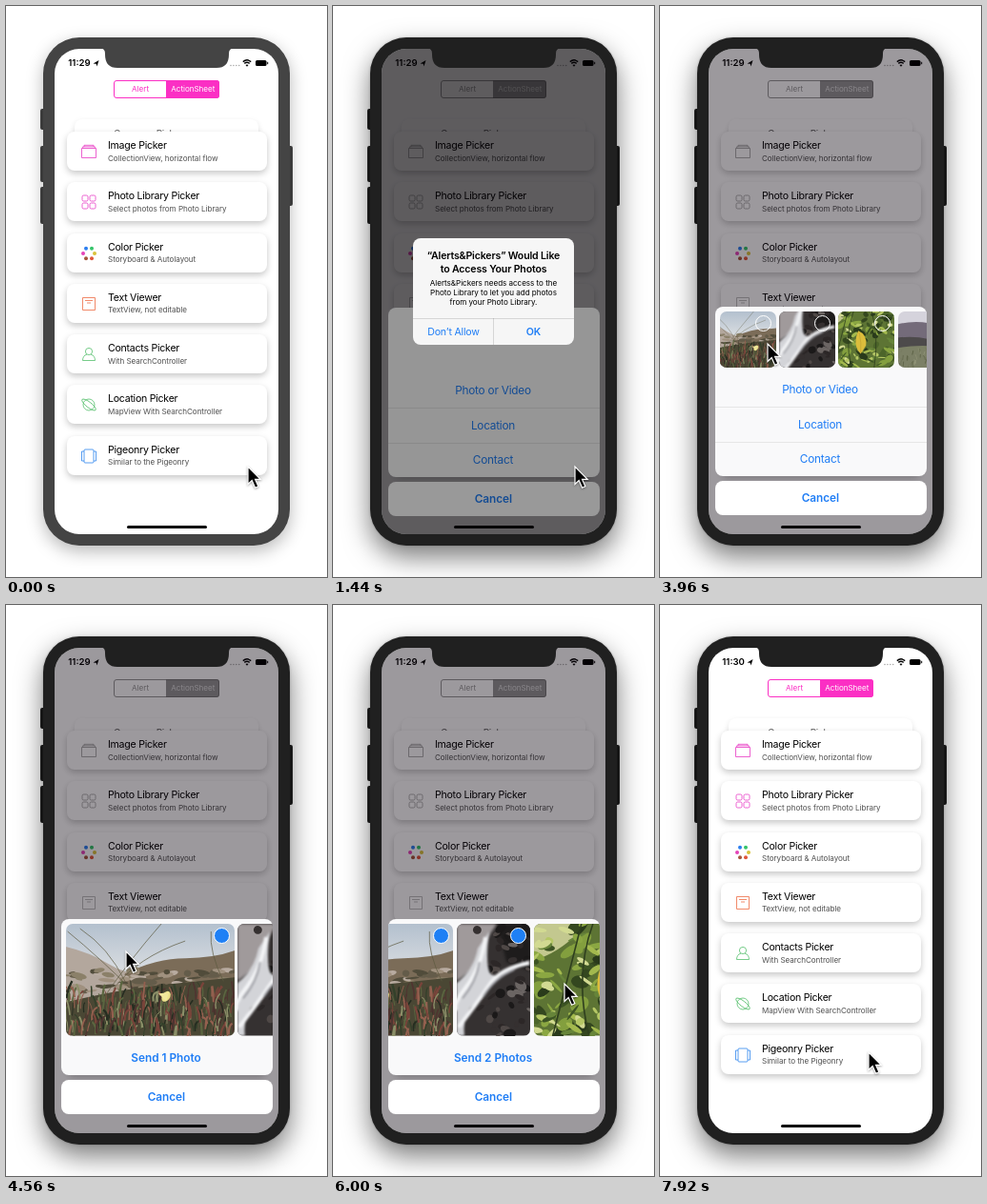
Recreate the animation shown at these times as an HTML page. Size 337 px wide and 600 px high, loop 8000 ms.

```html
<!DOCTYPE html>
<html lang="en">
<head>
<meta charset="utf-8">
<title>Pickers demo</title>
<style>
html, body { margin: 0; width: 100%; height: 100%; overflow: hidden; background: #fff; }
#stage { position: relative; width: 337px; height: 600px; overflow: hidden; font-family: Inter, "Open Sans", sans-serif; color: #000; }
#stage div, #stage svg { position: absolute; box-sizing: border-box; }
svg { overflow: visible; }
.text { line-height: 0; white-space: nowrap; }
.mid { transform: translateX(-50%); }
.bold { font-weight: 600; }
.blue { color: #1f7df5; }
.body { background: var(--body); }
.icon { fill: none; stroke-width: .8; stroke-linejoin: round; }
.photo { border-radius: 7px; overflow: hidden; }
.photo svg { left: 0; top: 0; width: 100%; height: 100%; overflow: hidden; }
.check { right: 4.5px; top: 4px; width: 17px; height: 17px; border: 1.5px solid #fff; border-radius: 50%; }
</style>
</head>
<body>
<div id="stage"></div>
<script>
let seed = 7;
const rnd = (a = 0, b = 1) => {
  seed = (seed * 16807) % 2147483647;
  return a + (b - a) * seed / 2147483647;
};
const pick = list => list[Math.floor(rnd(0, list.length))];
const repeat = (n, fn) => Array.from({ length: n }, (_, i) => fn(i)).join('');

const box = (x, y, w, h, style = '', inner = '', attrs = '') =>
  `<div ${attrs} style="left:${x}px;top:${y}px;width:${w}px;height:${h}px;${style}">${inner}</div>`;
// y is the middle of the capitals
const text = (x, y, size, str, cls = '', track = 0, attrs = '') =>
  `<div ${attrs} class="text ${cls}" style="left:${x}px;top:${y}px;font-size:${size}px;letter-spacing:${track}px">${str}</div>`;
const vec = (x, y, inner, attrs = '') =>
  `<svg ${attrs} style="left:${x}px;top:${y}px" width="1" height="1">${inner}</svg>`;
const path = (d, stroke, width = 1, fill = 'none') =>
  `<path d="${d}" stroke="${stroke}" stroke-width="${width}" fill="${fill}"/>`;
const fill = (d, color) => `<path d="${d}" fill="${color}"/>`;

// List of cards
const dots = ['#35c46a', '#d8c23a', '#e0563a', '#a5563c', '#e444b8', '#2d7ff0'];
const cards = [
  ['Image Picker', 'CollectionView, horizontal flow', '#e83cc4',
    '<path d="M-7.5-3.5h15v10h-15zM-6.3-3.5v-1.7h12.6v1.7M-5-5.2v-1.5h10v1.5"/>'],
  ['Photo Library Picker', 'Select photos from Photo Library', '#e83cc4',
    repeat(4, i => `<rect x="${i % 2 ? 1 : -7}" y="${i > 1 ? 1 : -7}" width="6" height="6" rx="1.5"/>`)],
  ['Color Picker', 'Storyboard &amp; Autolayout', 'none',
    dots.map((c, i) => {
      const a = (i - 1) * Math.PI / 3;
      return `<circle cx="${6 * Math.cos(a)}" cy="${6 * Math.sin(a)}" r="2" fill="${c}"/>`;
    }).join('')],
  ['Text Viewer', 'TextView, not editable', '#ee6d45',
    '<path d="M-6.5-6.5h13v13h-13zM-4-3.5h8M-2-1h4"/>'],
  ['Contacts Picker', 'With SearchController', '#55bf6c',
    '<circle cy="-3" r="3.6"/><path d="M-2 0Q-6.5 1.5-6.5 6.5H6.5Q6.5 1.5 2 0"/>'],
  ['Location Picker', 'MapView With SearchController', '#55bf6c',
    '<circle r="6"/><ellipse rx="9" ry="2.8" transform="rotate(38)"/>'],
  ['Pigeonry Picker', 'Similar to the Pigeonry', '#2f86ee',
    '<rect x="-5" y="-7" width="10" height="14" rx="1"/><path d="M-5-5h-2.5v10H-5M5-5h2.5v10H5"/>']
];
const shadow = 'box-shadow:0 3px 7px rgba(0,0,0,.22);border-radius:8px;background:#fff;';
const list = box(72, 119, 193, 40, shadow + 'opacity:.6') +
  text(113, 134, 10, '<span style="color:#666">Currency Picker</span>', '', -.2) +
  cards.map(([name, note, color, icon], i) => {
    const y = 132 + i * 53.25;
    return box(64, y, 209.5, 41, shadow) +
      vec(87, y + 21, icon, `class="icon ${color === 'none' ? '' : 'tint'}" stroke="${color}"`) +
      text(107, y + 15, 10.6, name, '', -.26) +
      text(107, y + 27.5, 8.1, `<span style="color:#505050">${note}</span>`, '', -.05);
  }).join('');

const pink = '#fb2fc4';
const segments = box(113, 78, 111, 18.5, `border:1px solid ${pink};border-radius:3px`, '', 'class="tint"') +
  box(168, 78, 56, 18.5, `background:${pink};border-radius:0 3px 3px 0`, '', 'class="tint"') +
  text(141, 87.3, 8.1, `<span style="color:${pink}">Alert</span>`, 'mid tint') +
  text(196.3, 87.3, 8.1, '<span style="color:#fff">ActionSheet</span>', 'mid tint', -.05);

const status = text(65.3, 60.2, 9.6, '', 'bold', 0, 'id="clock"') +
  vec(0, 0, fill('M91.5 60.5L97.5 57 95.5 63.5 94.7 60.8Z', '#000') +
    repeat(4, i => `<circle cx="${236 + i * 2.9}" cy="62.5" r=".8" fill="#aaa"/>`) +
    path('M248.8 58.6Q253 55 257.2 58.6M250.3 60.4Q253 58.2 255.7 60.4', '#000', 1.4) +
    fill('M251.5 62L253 63.8 254.5 62Q253 60.9 251.5 62Z', '#000') +
    '<rect x="262" y="57" width="11.5" height="6" rx="1.5"/><rect x="274.2" y="58.8" width="1" height="2.4"/>');

// Landscapes in the photo strip
const blades = (n, x, y, colors, lean, len) => repeat(n, () => {
  const px = rnd(...x), py = rnd(...y);
  return path(`M${px} ${py}q${rnd(-2, 2)} ${-len / 2} ${rnd(-lean, lean)} ${-rnd(len / 2, len)}`, pick(colors), rnd(.8, 2.4));
});
const blobs = (n, x, y, rx, ry, colors, turn = 0) => repeat(n, () => {
  const px = rnd(...x), py = rnd(...y);
  return `<ellipse cx="${px}" cy="${py}" rx="${rnd(...rx)}" ry="${rnd(...ry)}" transform="rotate(${rnd(-turn, turn)} ${px} ${py})" fill="${pick(colors)}"/>`;
});
const soft = (amount, inner) => `<g style="filter:blur(${amount}px)">${inner}</g>`;
const flat = color => fill('M0 0H177V117H0Z', color);
const sky = '<defs><linearGradient id="sky" x2="0" y2="1"><stop stop-color="#b3c0ce"/><stop offset=".5" stop-color="#e0e2e4"/></linearGradient></defs>';

const coast = sky + flat('url(#sky)') + soft(.7,
  fill('M0 24Q25 30 45 42T85 52L177 60V117H0Z', '#b3a79d') +
  fill('M62 52Q95 36 125 36T177 28V80H55Z', '#7b6c58') +
  blobs(70, [0, 177], [48, 72], [3, 9], [1, 3.5], ['#645c4a', '#8b8069', '#514c3b', '#a0917f', '#b8aba0'], 15)) +
  fill('M0 82Q60 68 100 64T177 56V117H0Z', '#4a4734') +
  blades(280, [0, 177], [76, 121], ['#5b6640', '#79443a', '#33402a', '#8b8f68', '#94604f', '#252c20', '#4f3430'], 6, 19) +
  path('M2 8Q35 35 70 70M15 5Q45 25 62 60M38 80Q65 40 100 0M50 68Q75 35 125 18M165 60Q150 30 152 8', '#5c5a40', .7) +
  soft(.4, '<ellipse cx="105" cy="76" rx="4" ry="6"/>'.replace('/>', ' transform="rotate(35 105 76)" fill="#ece18a"/>') +
    fill('M97 73L108 72 105 81Z', '#f1e79c'));

const falls = flat('#353131') +
  soft(1.5, fill('M0 0H42Q26 22 22 45L0 60Z', '#a09a9b') + fill('M42 0H78V50L52 40Z', '#1e1c1c')) +
  soft(.6, blobs(60, [20, 78], [2, 117], [2, 7], [1.5, 5], ['#1b1919', '#4f4846', '#2c2727', '#6b6563', '#353030'], 40)) +
  soft(1.2, fill('M78 38Q54 42 44 56T14 88Q6 102 8 117H0V62Q18 48 22 26L34 8Q30 38 34 50T78 38Z', '#d3d4d8') +
    path('M76 41Q46 46 34 64T2 108M30 14Q26 45 10 66T0 90', '#f3f4f6', 4) +
    path('M60 48Q40 56 28 76M24 40Q20 62 6 78', '#9fa0a6', 2));

const garden = flat('#5d7434') + soft(.6,
  fill('M0 0H55Q30 30 0 38Z', '#c3c88f') +
  blobs(60, [0, 177], [0, 117], [4, 12], [3, 9], ['#34471f', '#4c652a', '#839f3e', '#293a1b'], 60) +
  blobs(110, [0, 177], [0, 117], [3, 11], [1.2, 4], ['#8ba742', '#b5c765', '#d2da92', '#67853a', '#3d5424', '#a3b94e'], 60) +
  path('M20 117Q35 60 50 0M58 117Q42 55 62 0M105 117Q115 55 100 0', '#2f3f1e', 1.6) +
  fill('M72 40Q91 48 88 71L77 88Q59 70 72 40Z', '#dcbd3c')) + path('M74 44Q79 65 77 86', '#b08f2c', .8);

const hills = flat('#d5d3dc') + soft(1,
  fill('M0 35Q70 10 115 32L177 55V117H0Z', '#746b7a') +
  fill('M0 60Q60 45 110 62T177 70V117H0Z', '#4d4a4b') +
  fill('M0 82Q80 60 177 84V117H0Z', '#7c8066')) +
  blades(70, [0, 177], [85, 118], ['#939678', '#606549', '#74775d'], 4, 12);

const photos = [[coast, 177], [falls, 77.5], [garden, 177], [hills, 177]];
const strip = photos.map(([art, w]) =>
  `<div class="photo"><svg viewBox="0 0 ${w} 117" preserveAspectRatio="xMidYMid slice">${art}</svg><div class="check"></div></div>`).join('');

const rule = (x, y, w, h, alpha) => box(x, y, w, h, `background:rgba(0,0,0,${alpha})`);
const sheet = box(0, 0, 337, 600, '',
  box(57.5, 316, 222, 178, 'border-radius:8px;background:#f9f9fa;overflow:hidden',
    box(0, 0, 222, 178, '', strip, 'id="strip"') +
    box(0, 0, 222, 178, 'top:auto;bottom:0',
      ['Photo or Video', 'Location', 'Contact']
        .map((s, i) => text(110.5, 87.2 + i * 36.3, 11.8, s, 'mid blue', -.22)).join('') +
      rule(0, 105, 222, .7, .08) + rule(0, 141.5, 222, .7, .08), 'id="options"') +
    box(0, 0, 222, 178, 'top:auto;bottom:0', text(110.5, 159.7, 11.8, '', 'mid blue bold', 0, 'id="send"'), 'id="sendRow"'),
    'id="panel"') +
  box(57.5, 499, 222, 36, 'border-radius:8px;background:#fff') +
  text(168.3, 517, 11.8, 'Cancel', 'mid blue bold', -.05), 'id="sheet"');

const alertBox = box(0, 0, 337, 600, '',
  box(0, 0, 337, 600, 'background:rgba(0,0,0,.4)') +
  box(84, 244, 169, 112, 'border-radius:8px;background:#f6f6f6') +
  text(168.5, 263.3, 10.6, '“Alerts&amp;Pickers” Would Like', 'mid bold', -.17) +
  text(168.5, 277, 10.6, 'to Access Your Photos', 'mid bold', -.17) +
  ['Alerts&amp;Pickers needs access to the', 'Photo Library to let you add photos', 'from your Photo Library.']
    .map((s, i) => text(168.5, 290.7 + i * 10, 8.1, s, 'mid', -.04)).join('') +
  rule(84, 328, 169, .7, .13) + rule(168, 328, .7, 28, .13) +
  text(126.5, 342.5, 10.6, 'Don’t Allow', 'mid blue', -.2) +
  text(210.5, 342.5, 10.6, 'OK', 'mid blue bold'), 'id="alert"');

stage.innerHTML =
  [[36, 108, 22], [36, 147, 38], [36, 190, 39], [295, 147, 63]]
    .map(([x, y, h]) => box(x, y, 6, h, 'border-radius:2px', '', 'class="body"')).join('') +
  box(39, 33, 259, 534, 'border-radius:38px', '', 'class="body" id="phone"') +
  box(51, 45, 235, 510, 'border-radius:26px;background:#fff;overflow:hidden',
    box(-51, -45, 337, 600, '',
      list + segments + status +
      box(127, 546.3, 83.5, 3, 'border-radius:2px;background:#000') +
      box(0, 0, 337, 600, 'background:#08000a', '', 'id="dim"') + sheet + alertBox)) +
  vec(.5, -.3, '<path d="M99 44.5q4 .5 4 5.5v1q0 14 13 14h104q13 0 13-14v-1q0-5 4-5.5z" style="fill:var(--body)"/>') +
  vec(0, 0, '<path d="M0 0V18.5L4.2 14.6 7.6 22.3 10.9 20.8 7.6 13.4H13.2Z" stroke="#fff" stroke-width="1.2"/>',
    'id="cursor"').replace('style="', 'style="filter:drop-shadow(0 1px 1px rgba(0,0,0,.35));');

const el = id => document.getElementById(id);
const photoEls = [...document.querySelectorAll('.photo')];
const checks = [...document.querySelectorAll('.check')];
const tinted = [...document.querySelectorAll('.tint')];
const mix = (a, b, p) => a + (b - a) * p;

// Eased value between [time, value] keys
function ease(t, keys) {
  const i = keys.findIndex(k => k[0] > t);
  if (i < 0) return keys[keys.length - 1][1];
  if (!i) return keys[0][1];
  const [[t0, a], [t1, b]] = [keys[i - 1], keys[i]];
  const p = (t - t0) / (t1 - t0);
  return mix(a, b, p * p * (3 - 2 * p));
}
// Last value whose time has come
const hold = (t, keys) => keys.reduce((v, k) => t >= k[0] ? k[1] : v, 0);

const route = [[1740, 254, 484], [2460, 206, 340], [3420, 206, 340], [3780, 113, 355], [4440, 113, 355],
  [4980, 219, 426], [5160, 251, 400], [5820, 251, 400], [6000, 243, 398], [6300, 243, 398], [6840, 219, 470]];

function draw(t) {
  const active = t >= 960;
  stage.style.setProperty('--body', active ? '#202020' : '#444');
  el('phone').style.boxShadow = active
    ? '0 12px 28px rgba(0,0,0,.52), 0 0 2px rgba(0,0,0,.3)' : '0 6px 18px rgba(0,0,0,.28)';
  el('clock').textContent = t < 7860 ? '11:29' : '11:30';

  const grey = t < 1320 ? 0 : ease(t, [[7680, 1], [7920, 0]]);
  tinted.forEach(e => {
    e.style.filter = grey ? `grayscale(${grey})` : '';
    e.style.opacity = 1 - .32 * grey;
  });

  el('dim').style.opacity = hold(t, [[1320, .25], [1440, .4], [7380, .33], [7500, .14], [7560, 0]]);
  const down = hold(t, [[0, 260], [1320, 90], [1440, 1], [1620, 0], [7380, 45], [7500, 155], [7560, 260]]);
  el('sheet').style.transform = `translateY(${down}px)`;
  el('alert').style.opacity = hold(t, [[1440, 1], [2880, .55], [3060, .15], [3120, 0]]);

  const grow = ease(t, [[4140, 0], [4560, 1]]);
  const scroll = ease(t, [[5460, 0], [5880, 113.5]]);
  const top = mix(316, 330, grow);
  Object.assign(el('panel').style, { top: top + 'px', height: 494 - top + 'px' });
  el('strip').style.opacity = hold(t, [[3120, 1]]);
  el('options').style.opacity = Math.max(0, 1 - grow * 2);
  el('sendRow').style.opacity = Math.max(0, grow * 2 - 1);
  el('send').textContent = t < 5520 ? 'Send 1 Photo' : 'Send 2 Photos';

  let x = 5;
  photos.forEach(([, w], i) => {
    Object.assign(photoEls[i].style, {
      left: mix(5 + i * 62.4, x - scroll, grow) + 'px', top: '5px',
      width: mix(59, w, grow) + 'px', height: mix(59, 117.5, grow) + 'px'
    });
    x += w + 3.7;
    checks[i].style.background = t >= [4200, 5520][i] ? '#1f80f5' : 'none';
  });

  const [cx, cy] = [1, 2].map(j => ease(t, route.map(k => [k[0], k[j]])));
  el('cursor').style.left = cx + 'px';
  el('cursor').style.top = cy + 'px';
}

function tick() {
  const t = performance.now() % 8000;
  draw(Math.floor(t / 60) * 60);
  requestAnimationFrame(tick);
}
tick();
</script>
</body>
</html>
```
